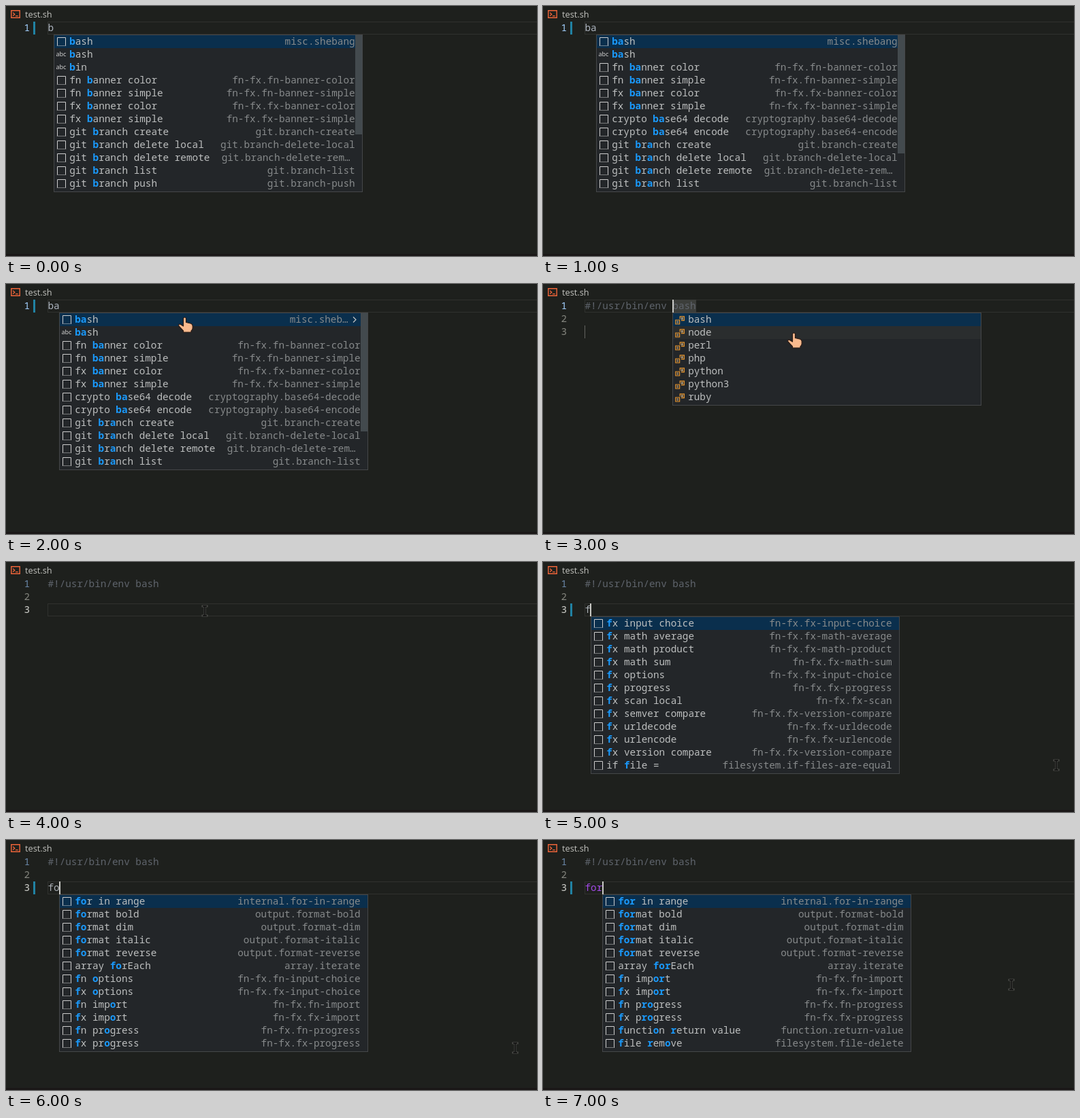
Recreate the animation shown at these times as an HTML page. Size 780 px wide and 368 px high, loop 8000 ms.

```html
<!DOCTYPE html>
<html lang="en">
<head>
<meta charset="utf-8">
<title>Shell snippets</title>
<style>
html, body { margin: 0; width: 100%; height: 100%; overflow: hidden; background: #1e201d; }
#stage {
  position: relative; width: 780px; height: 368px; overflow: hidden; background: #1e201d;
  font: 14.32px/17px "Noto Sans Mono", "DejaVu Sans Mono", monospace;
  font-variant-ligatures: none; white-space: pre;
}
#stage div, #stage svg { position: absolute; box-sizing: border-box; }
#stage svg { overflow: visible; }
.scene { inset: 0; visibility: hidden; animation: show 8s step-end infinite; }
@keyframes show { 0% { visibility: visible; } 12.5%, 100% { visibility: hidden; } }
.tab { left: 28px; top: 4px; font: 12.8px/17px "Open Sans", "Noto Sans", sans-serif; color: #c3c3bf; }
.foot { left: 0; top: 365px; width: 780px; height: 3px; background: #1a1717; }
.top { left: 108px; top: 0; width: 672px; height: 1px; background: #1a1b19; }
.num { left: 0; width: 35px; text-align: right; color: #85867f; }
.num.first { color: #6b88aa; }
.num.on { color: #d0d0cc; }
.num.first.on { color: #a3d0ff; }
.code { left: 61.5px; color: #5f646c; }
.line { left: 61px; width: 730px; height: 19px; border: 1px solid #30312e; }
.bar { left: 40px; width: 3px; height: 19px; background: #2182a3; }
.caret { width: 2px; height: 19px; background: #c8c8c4; }
.field { left: 190px; top: 23px; width: 35px; height: 19px; background: #3c3e3b; }
.stop { left: 61px; top: 61px; width: 1px; height: 19px; background: #62635f; }
.menu { width: 454px; background: #232629; border: 1px solid #454749; color: #bdbfbf; }
.row { left: 0; width: 452px; height: 19px; }
.row.sel { background: #0a2f4d; }
.row.hover { background: #2a2d2e; }
.row svg { left: 3px; top: 2px; }
.label { left: 22.2px; }
.label b { color: #1a99fb; }
.detail { color: #878a8b; }
.abc { left: 2.5px; font: 9px/18px "Noto Sans", sans-serif; color: #d0d0d0; }
.thumb { left: 442px; top: 0; width: 10px; background: #434a4e; }
</style>
</head>
<body>
<div id="stage">
  <div class="top"></div>
  <svg style="left:7px;top:6px" width="14" height="13" fill="none" stroke="#f0653a">
    <path stroke-width="1.4" d="M.8 .8H13.2V11.3H.8Z"/>
    <path stroke-width="1.3" d="M3.2 3.8L5.8 6.2L3.2 8.6M7 8.7H10.8"/>
  </svg>
  <div class="tab">test.sh</div>
  <div class="foot"></div>
</div>
<script>
const CHAR = 8.59, ROW = 19, LEFT = 61.5;
const stage = document.getElementById('stage');

const box = (cls, style = '', inner = '') => `<div class="${cls}" style="${style}">${inner}</div>`;
const svg = (x, y, inner) => `<svg style="left:${x}px;top:${y}px" width="1" height="1" fill="none">${inner}</svg>`;
const lineTop = n => 23 + (n - 1) * ROW;

const icons = {
  snippet: svg(4, 3, `<g stroke="#cdcdcd"><path d="M.5 12V.5H12.5V12"/>
    <path stroke-dasharray="1 1" d="M0 12.5H13"/></g>`),
  word: box('abc', '', 'abc'),
  choice: svg(3, 4, `<g stroke="#e8962e" stroke-width="1.2"><path d="M7.2 4.6V.8H13.4V6.6H9"/>
    <path d="M.8 6H6.6V12H.8Z"/><path stroke="#d5b78d" d="M8.8 2.8H11.8M8.8 4.7H11.8M2.4 8H5M2.4 10H5"/></g>`)
};

const hand = (x, y) => svg(x, y, `<path fill="#f8ba8e" stroke="#2b1a14" stroke-width="1.2" stroke-linejoin="round"
  d="M8.5 3.5Q10.5 .5 12.5 3.5V9.5L19 11Q22.5 12 22.2 15.5V18Q22 20.5 20 22V24H8.5V22L2 15Q.8 11.5 4 12.2L8.5 15Z"/>`);

const beam = (x, y) => {
  const d = 'M-3 -7H3M0 -7V7M-3 7H3';
  return svg(x, y, `<path stroke="#4c4d4a" stroke-width="3" stroke-linecap="square" d="${d}"/>
    <path stroke="#0c0d0c" stroke-width="1.5" d="${d}"/>`);
};

// Item syntax: "[~]label|detail", "*" marks matched letters, "~" a plain word.
function menuRow(item, i, m) {
  const word = item[0] === '~';
  const [label, detail = ''] = item.slice(word ? 1 : 0).split('|');
  const more = detail.endsWith('>');
  const right = 10.4 + (more ? 18 : detail.endsWith('…') ? 7 : 0);
  const cls = 'row' + (i === 0 ? ' sel' : i === m.hover ? ' hover' : '');
  return box(cls, `top:${i * ROW}px`,
    icons[word ? 'word' : m.icon || 'snippet'] +
    box('label', '', label.replace(/\*(.+?)\*/g, '<b>$1</b>')) +
    box('detail', `right:${right}px`, more ? detail.slice(0, -1) : detail) +
    (more ? svg(430, 5, '<path stroke="#c5c5c5" stroke-width="1.2" d="M1 .5L5 4.5L1 8.5"/>') : ''));
}

function menu(m) {
  const left = Math.floor(LEFT + m.col * CHAR), height = m.items.length * ROW + 4;
  return box('menu', `left:${left}px;top:${lineTop(m.line) + ROW}px;height:${height}px`,
    m.items.map((item, i) => menuRow(item, i, m)).join('') +
    (m.thumb ? box('thumb', `height:${m.thumb}px`) : ''));
}

function editor({ lines, at, bar, caret, extra = '', list, pointer = '' }) {
  let out = box('line', `top:${lineTop(at)}px`) + extra;
  lines.forEach((text, i) => {
    const top = `top:${lineTop(i + 1)}px`;
    out += box(`num${i ? '' : ' first'}${i + 1 === at ? ' on' : ''}`, top, i + 1) + box('code', top, text);
  });
  if (bar) out += box('bar', `top:${lineTop(at)}px`);
  if (caret) out += box('caret', `left:${LEFT + caret * CHAR - .7}px;top:${lineTop(at)}px`);
  return out + (list ? menu(list) : '') + pointer;
}

const tint = (text, color) => `<span style="color:${color}">${text}</span>`;
const shebang = '#!/usr/bin/env bash';
const banners = ['fn', 'fx'].flatMap(p => ['color', 'simple'].map(s => [p, s]));
const bannerItems = mark => banners.map(([p, s]) => `${p} *${mark}*${'banner'.slice(mark.length)} ${s}|fn-fx.${p}-banner-${s}`);
const branchItems = (word, kinds) => kinds.map(k => {
  const id = 'git.branch-' + k.replace(' ', '-');
  return `git ${word} ${k}|${id.length > 23 ? id.slice(0, 21) + '…' : id}`;
});
const branchKinds = ['create', 'delete local', 'delete remote', 'list', 'push'];

const listB = {
  line: 1, col: 1, thumb: 146,
  items: ['*b*ash|misc.shebang', '~*b*ash', '~*b*in', ...bannerItems('b'), ...branchItems('*b*ranch', branchKinds)]
};
const listBa = detail => ({
  line: 1, col: 2, thumb: 174,
  items: ['*ba*sh|' + detail, '~*ba*sh', ...bannerItems('ba'),
    ...['decode', 'encode'].map(s => `crypto *ba*se64 ${s}|cryptography.base64-${s}`),
    ...branchItems('*b*r*a*nch', branchKinds.slice(0, 4))]
});
const shells = {
  line: 1, col: 15, icon: 'choice', hover: 1,
  items: ['bash', 'node', 'perl', 'php', 'python', 'python3', 'ruby']
};
const listF = {
  line: 3, col: 1,
  items: [
    ['input choice', 'input-choice'], ['math average', 'math-average'], ['math product', 'math-product'],
    ['math sum', 'math-sum'], ['options', 'input-choice'], ['progress', 'progress'], ['scan local', 'scan'],
    ['semver compare', 'version-compare'], ['urldecode', 'urldecode'], ['urlencode', 'urlencode'],
    ['version compare', 'version-compare']
  ].map(([a, b]) => `*f*x ${a}|fn-fx.fx-${b}`).concat('if *f*ile =|filesystem.if-files-are-equal')
};
const forItems = (mark, rest) => [
  `*${mark}*${rest} in range|internal.for-in-range`,
  ...['bold', 'dim', 'italic', 'reverse'].map(s => `*${mark}*${rest}mat ${s}|output.format-${s}`),
  `array *${mark}*${rest}Each|array.iterate`
];
const pair = (text, id) => ['n', 'x'].map(c => `*f*${c} ${text}|fn-fx.f${c}-${id}`);
const listFo = {
  line: 3, col: 2,
  items: [...forItems('fo', 'r'), ...pair('*o*ptions', 'input-choice'),
    ...pair('imp*o*rt', 'import'), ...pair('pr*o*gress', 'progress')]
};
const listFor = {
  line: 3, col: 3,
  items: [...forItems('for', ''), ...pair('imp*or*t', 'import'), ...pair('p*ro*gress', 'progress'),
    '*f*uncti*o*n *r*eturn value|function.return-value', '*f*ile *r*em*o*ve|filesystem.file-delete']
};

const first = (text, list, pointer) => ({ lines: [tint(text, '#adb4bf')], at: 1, bar: true, list, pointer });
const third = (text, list, pointer, color = '#a9aeb4') =>
  ({ lines: [shebang, '', tint(text, color)], at: 3, bar: true, caret: text.length, list, pointer });

const scenes = [
  first('b', listB),
  first('ba', listBa('misc.shebang')),
  first('ba', listBa('misc.sheb…>'), hand(252, 47)),
  {
    lines: [shebang, '', ''], at: 1, caret: 15, list: shells, pointer: hand(358, 70),
    extra: box('field') + box('stop')
  },
  { lines: [shebang, '', ''], at: 3, pointer: beam(291.5, 71.5) },
  third('f', listF, beam(753.5, 298.5)),
  third('fo', listFo, beam(747.5, 305.5)),
  third('for', listFor, beam(687.5, 212.5), '#a24ae6')
];

stage.insertAdjacentHTML('beforeend', scenes.map((s, i) =>
  box('scene', `animation-delay:${i - scenes.length}s`, editor(s))).join(''));
</script>
</body>
</html>
```
